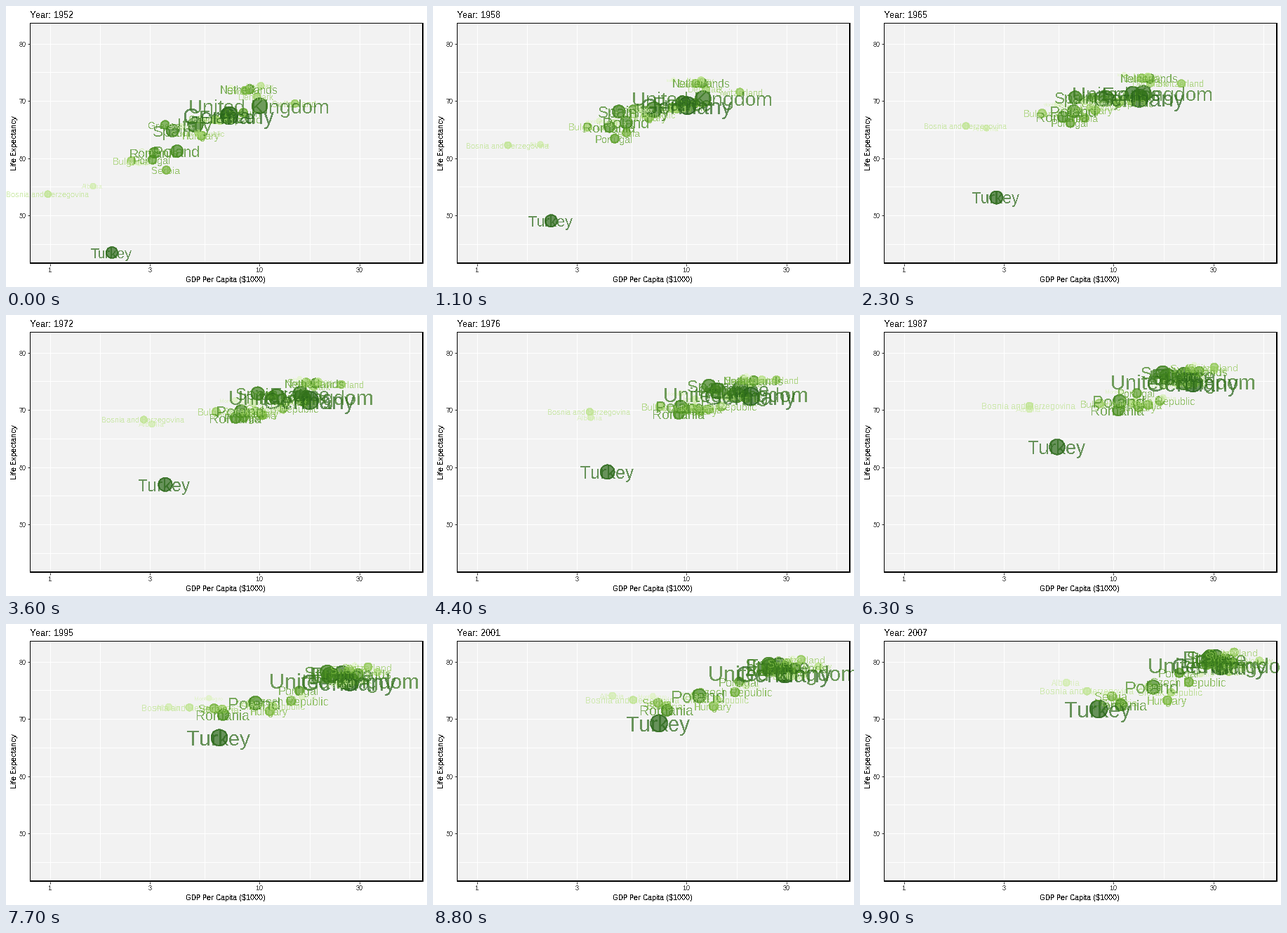
Animation of 600x400 px, one loop 10 s. Source, as a matplotlib script:

```python
import numpy as np
import matplotlib.pyplot as plt
from matplotlib.animation import FuncAnimation
from matplotlib.colors import LinearSegmentedColormap
from matplotlib.patches import Rectangle

plt.rcParams.update({
    "font.family": "Liberation Sans",
    "text.hinting": "native",
    "text.hinting_factor": 1,
    "text.antialiased": False,
})

FRAMES = 100
START, MID, END = 1952, 1977, 2007
PT = 0.72                    # points per pixel at 100 dpi
ALPHA = 0.7
LEFT, TOP, RIGHT, BOTTOM = 34, 24, 595, 367

# population (millions) at start and end,
# then GDP ($1000) and life expectancy at start, middle and end
STEADY = {
    "Austria": (6.93, 8.2, 6.14, 19.7, 36.1, 66.8, 72.2, 79.8),
    "Belgium": (8.73, 10.39, 8.34, 19.1, 33.7, 68, 72.8, 79.4),
    "Denmark": (4.33, 5.47, 9.69, 20.4, 35.3, 70.8, 74.7, 78.3),
    "Finland": (4.09, 5.24, 6.43, 15.6, 33.2, 66.6, 72.5, 79.3),
    "France": (42.5, 61.1, 7.03, 18.3, 30.5, 67.4, 73.8, 80.7),
    "Germany": (69.1, 82.4, 7.14, 20.5, 32.2, 67.5, 72.5, 79.4),
    "Greece": (7.73, 10.71, 3.53, 14.2, 27.5, 65.9, 73.7, 79.5),
    "Italy": (47.7, 58.1, 4.93, 14.3, 28.6, 65.9, 73.5, 80.5),
    "Netherlands": (10.4, 16.6, 8.94, 21.2, 36.8, 72.1, 75.2, 79.8),
    "Portugal": (8.53, 10.64, 3.07, 10.2, 20.5, 59.8, 70.4, 78.1),
    "Sweden": (7.12, 9.03, 8.53, 18.9, 33.9, 71.9, 75.4, 80.9),
    "Switzerland": (4.82, 7.55, 14.7, 27, 37.5, 69.6, 75.4, 81.7),
    "United Kingdom": (50.4, 60.8, 9.98, 17.4, 33.2, 69.2, 72.8, 79.4),
}
LATE = {
    "Iceland": (0.15, 0.3, 7.27, 19.7, 36.2, 72.5, 76.1, 81.8),
    "Ireland": (2.95, 4.11, 5.21, 11.2, 40.7, 66.9, 72, 78.9),
    "Norway": (3.33, 4.63, 10.1, 23.3, 49.4, 72.7, 75.4, 80.2),
    "Spain": (28.5, 40.4, 3.83, 13.2, 28.8, 64.9, 74.4, 80.9),
    "Turkey": (22.2, 71.2, 1.97, 4.27, 8.46, 43.6, 59.5, 71.8),
}
EAST = {
    "Albania": (1.28, 3.6, 1.6, 3.53, 5.94, 55.2, 68.9, 76.4),
    "Bosnia and Herzegovina": (2.79, 4.55, 0.974, 3.53, 7.45, 53.8, 69.9, 74.9),
    "Bulgaria": (7.27, 7.32, 2.44, 7.61, 10.7, 59.6, 70.8, 73),
    "Croatia": (3.88, 4.49, 3.12, 11.3, 14.6, 61.2, 70.6, 75.7),
    "Czech Republic": (9.13, 10.23, 6.88, 14.8, 22.8, 66.9, 70.7, 76.5),
    "Hungary": (9.5, 9.96, 5.26, 11.7, 18, 64, 70, 73.3),
    "Montenegro": (0.41, 0.68, 2.65, 9.6, 9.25, 59.2, 73.1, 74.5),
    "Poland": (25.7, 38.5, 4.03, 9.51, 15.4, 61.3, 70.7, 75.6),
    "Romania": (16.6, 22.3, 3.14, 9.36, 10.8, 61, 69.5, 72.5),
    "Serbia": (6.86, 10.15, 3.58, 13, 9.79, 58, 70.3, 74),
    "Slovak Republic": (3.56, 5.45, 5.08, 10.9, 18.7, 64.4, 70.5, 74.7),
    "Slovenia": (1.49, 2.01, 4.21, 15.3, 25.8, 65.6, 71, 77.9),
}


def ease(keys, year, p, q=1):
    """Run through three keys, with power easing p then q."""
    a, b, c = keys
    if year < MID:
        return a + (b - a) * ((year - START) / (MID - START)) ** p
    return b + (c - b) * ((year - MID) / (END - MID)) ** q


def slump(keys, year):
    """Slow growth to 1987, collapse by 1992, then recovery."""
    _, b, c = keys
    path = [b, 1.12 * b, 0.57 * c, 0.66 * c, 0.77 * c, c]
    return np.interp(year, [MID, 1987, 1992, 1997, 2002, END], np.log10(path))


def state(name, year):
    """Log GDP and life expectancy of a country."""
    row = countries[name]
    gdp, life = np.log10(row[2:5]), row[5:]
    if name in EAST:
        wealth = ease(gdp, year, 0.9) if year < MID else slump(row[2:5], year)
        return wealth, ease(life, year, 0.45, 1.6)
    return ease(gdp, year, 1.25 if name in LATE else 0.8), ease(life, year, 0.75)


def px(log_gdp):
    return 63.04 + 298.8 * log_gdp


def py(life):
    return 298.75 - 8.157 * (life - 50)


countries = dict(sorted({**STEADY, **LATE, **EAST}.items()))
pops = np.array([row[:2] for row in countries.values()])
em = 2.845 * (2 + 10 * np.sqrt((pops - pops.min()) / (pops.max() - pops.min())))

# darkest green for the largest population
rank = np.argsort(np.argsort(-pops[:, 1]))
greens = LinearSegmentedColormap.from_list(
    "greens", ["#276419", "#4D9221", "#7FBC41", "#B8E186", "#E6F5D0"], N=len(countries))
colors = greens(rank)

fig = plt.figure(figsize=(6, 4), dpi=100, facecolor="white")
ax = fig.add_axes([0, 0, 1, 1])
ax.set(xlim=(0, 600), ylim=(400, 0))
ax.axis("off")


def box(x0, y0, x1, y1, color, z):
    return ax.add_patch(Rectangle((x0, y0), x1 - x0, y1 - y0, fc=color, lw=0, zorder=z))


def line(x, y, color):
    ax.plot(x, y, color=color, lw=PT, zorder=1, solid_capstyle="butt")


def label(x, y, s, size, color="black", **kw):
    return ax.text(x, y, s, fontsize=size * PT, color=color, **kw)


panel = box(LEFT, TOP, RIGHT, BOTTOM, "#F2F2F2", 0)
ticks = px(np.log10([1, 3, 10, 30]))
minor = [*(ticks[:-1] + ticks[1:]) / 2, ticks[3] + (ticks[1] - ticks[0]) / 2]
for x in np.floor([*ticks, *minor]):
    line([x, x], [TOP, BOTTOM], "white")
for y in np.floor(py(np.arange(45, 85, 5))):
    line([LEFT, RIGHT], [y, y], "white")

for x, s in zip(np.floor(ticks), ("1", "3", "10", "30")):
    line([x, x], [BOTTOM, BOTTOM + 3], "#333333")
    label(x, 379, s, 9, "#4D4D4D", ha="center")
for v in (50, 60, 70, 80):
    y = np.floor(py(v))
    line([LEFT - 3, LEFT], [y, y], "#333333")
    label(29, y + 4, str(v), 9, "#4D4D4D", ha="right")

for edge in ((LEFT, TOP, LEFT + 1, BOTTOM), (LEFT, TOP, RIGHT, TOP + 1),
             (RIGHT - 2, TOP, RIGHT, BOTTOM), (LEFT, BOTTOM - 2, RIGHT, BOTTOM)):
    box(*edge, "black", 5)

label(313.5, 393, "GDP Per Capita ($1000)", 11, ha="center")
label(17.5, 195.5, "Life Expectancy", 11, rotation=90, ha="right", va="center")
title = label(34.5, 17, "", 13)

dots = ax.scatter(np.zeros(len(countries)), np.zeros(len(countries)), c=colors,
                  edgecolors=colors, alpha=ALPHA, linewidths=PT, zorder=2,
                  antialiaseds=False)
dots.set_clip_path(panel)
tags = []
for name, color in zip(countries, colors):
    tag = label(0, 0, name, 10, color, alpha=ALPHA, ha="center", zorder=3)
    tag.set_clip_path(panel)
    tags.append(tag)


def draw(i):
    t = i / (FRAMES - 1)
    year = START + (END - START) * t
    wealth, life = np.array([state(name, year) for name in countries]).T
    x, y = px(wealth), py(life)
    size = em[:, 0] + (em[:, 1] - em[:, 0]) * t
    dots.set_offsets(np.column_stack([x, y]))
    dots.set_sizes((0.75 * (size + 0.94) * PT) ** 2)
    for tag, tx, ty, s in zip(tags, x, y, np.round(size)):
        tag.set_position((tx - 1, ty + 0.358 * s + 0.5))
        tag.set_fontsize(s * PT)
    title.set_text(f"Year: {round(year)}")
    return [dots, title, *tags]


anim = FuncAnimation(fig, draw, frames=FRAMES, interval=100, repeat=True, repeat_delay=0)
plt.show()
```
